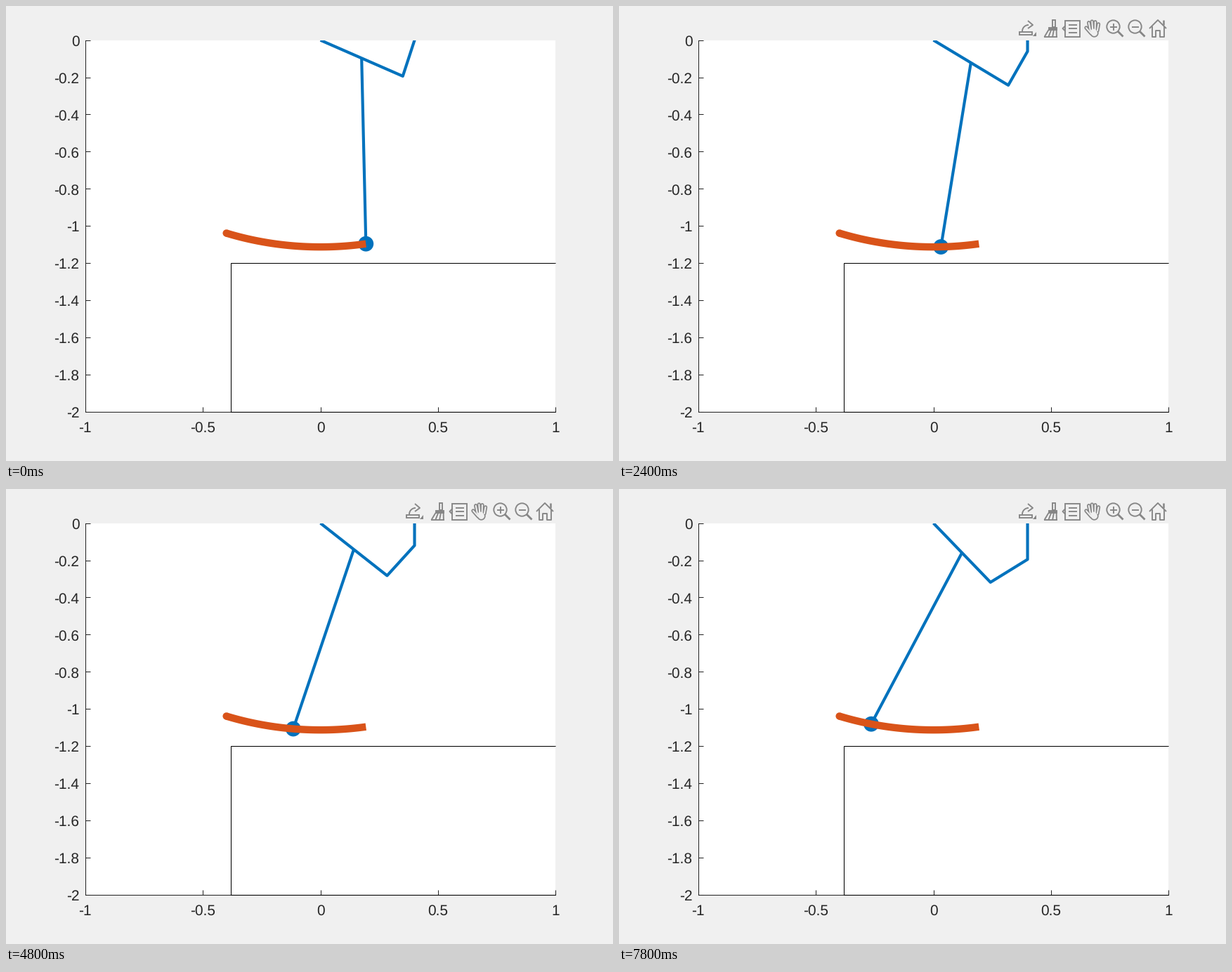
Animation, 864 px wide and 648 px high, one loop 8000 ms. Source, as a matplotlib script:

```python
import numpy as np
import matplotlib.pyplot as plt
from matplotlib.animation import FuncAnimation
from matplotlib.patches import Circle, Ellipse, Rectangle

plt.rcParams["font.family"] = "Liberation Sans"
plt.rcParams["text.hinting"] = "none"

W, H, DPI = 864, 648, 150
PT = 72 / DPI  # points per pixel
LEFT, RIGHT, TOP, BOTTOM = 112.8, 782.4, 48.7, 577.55
FRAMES, INTERVAL = 40, 200
BACK, INK, GREY = "#f0f0f0", "#262626", "#868686"
BLUE, ORANGE = "#0072bd", "#d95319"

CRANK, COUPLER, ROD = 0.4, 0.2, 1.0
RAIL_X = 0.4
STEP = 0.005  # slider drop per frame


def polar(r, angle):
    return r * np.array([np.cos(angle), np.sin(angle)])


def pose(drop):
    """Crank tip, crank middle and bob for a slider at (RAIL_X, -drop)."""
    dist = np.hypot(RAIL_X, drop)
    cos_gap = (CRANK**2 - COUPLER**2 + dist**2) / (2 * CRANK * dist)
    angle = -np.arctan2(drop, RAIL_X) - np.arccos(cos_gap)
    tip = polar(CRANK, angle)
    return tip, tip / 2, tip / 2 + polar(ROD, angle - np.pi / 3)


fig = plt.figure(figsize=(W / DPI, H / DPI), dpi=DPI, facecolor=BACK)
ax = fig.add_axes([LEFT / W, 1 - BOTTOM / H, (RIGHT - LEFT) / W,
                   (BOTTOM - TOP) / H])
ax.set(xlim=(-1, 1), ylim=(-2, 0))
ax.set_axisbelow(True)
ax.spines[["top", "right"]].set_visible(False)
for side in ("left", "bottom"):
    ax.spines[side].set(linewidth=0.5, color=INK, zorder=0.5)

xticks = np.linspace(-1, 1, 5)
yticks = np.linspace(-2, 0, 11)
ax.set_xticks(xticks, [""] * len(xticks))
ax.set_yticks(yticks, [""] * len(yticks))
ax.tick_params(direction="in", length=6.7 * PT, width=0.5, color=INK)


def label(value, xy, offset, ha):
    ax.annotate(f"{round(value, 1):g}", xy, offset, textcoords="offset pixels",
                ha=ha, va="center_baseline", size=10, color=INK,
                annotation_clip=False)


def disc(xy, diameter, color):
    """Round dot of a given size in pixels."""
    dot = Ellipse(xy, diameter * 2 / (RIGHT - LEFT),
                  diameter * 2 / (BOTTOM - TOP), fc=color, ec="none", zorder=2)
    return ax.add_patch(dot)


for x in xticks:
    label(x, (x, -2), (0, -22), "center")
for y in yticks:
    label(y, (-1, y), (-8.3, -0.5), "right")

# Table
ax.plot([1, -0.38, -0.38, 1], [-2, -2, -1.2, -1.2], color="black", lw=0.5,
        solid_capstyle="butt", solid_joinstyle="miter", clip_on=False)

# Moving linkage
style = dict(color=BLUE, lw=2, solid_capstyle="butt", solid_joinstyle="round")
link, = ax.plot([], [], **style)
rod, = ax.plot([], [], **style)
bob_dot = disc((0, 0), 21.8, BLUE)

# Whole path of the bob, up to its turning point
drops = np.linspace(0, CRANK * np.sin(np.pi / 3), 120)
path = np.array([pose(d)[2] for d in drops])
ax.plot(*path.T, color=ORANGE, lw=5, solid_capstyle="butt")
disc(path[-1], 5 / PT, ORANGE)

# Toolbar, in pixels from the top left
bar = fig.add_axes([0, 0, 1, 1])
bar.set(xlim=(0, W), ylim=(H, 0))
bar.axis("off")


def stroke(*points, width=1.9, color=GREY, cap="butt"):
    bar.plot(*zip(*points), color=color, lw=width * PT, solid_capstyle=cap,
             solid_joinstyle="round")


def box(x, y, w, h, color="none"):
    bar.add_patch(Rectangle((x, y), w, h, fc=color, ec=GREY, lw=1.9 * PT))


def export_icon(x):
    turn = np.linspace(np.pi, 1.5 * np.pi, 12)
    stroke(*((x + 2, 36) + polar(9, a) for a in turn))
    stroke((x + 1, 21), (x + 8, 27), (x + 1, 32))
    box(x - 11, 36.5, 18, 4.5)
    bar.fill([x + 8, x + 13, x + 13], [42.5, 42.5, 37], color=GREY, lw=0)


def brush_icon(x):
    box(x + 2, 20, 4, 10)
    box(x - 3, 30.5, 11, 3.5, GREY)
    for k in range(4):
        stroke((x - 3 + 3.7 * k, 34), (x - 9 + 5.8 * k, 44))
    stroke((x - 10, 44), (x + 9, 44))


def note_icon(x):
    box(x - 9.5, 20.5, 20.5, 23)
    stroke((x - 9, 28), (x - 13, 32), (x - 9, 36))
    for y in (26.5, 32, 37.5):
        stroke((x - 5, y), (x + 7, y))


def hand_icon(x):
    fingers = [((x - 4 + 3.3 * k, 35),
                (x - 6.3 + 4.6 * k, 22 + 1.2 * (k - 1.2) ** 2), 2)
               for k in range(4)]
    thumb = ((x - 10, 31), (x - 3, 39), 2)
    palm = ((x + 0.5, 37), (x + 1.5, 38.5), 9)
    parts = [*fingers, thumb, palm]
    for color, rim in ((GREY, 3.4), (BACK, 0)):
        for start, end, width in parts:
            stroke(start, end, width=width + rim, color=color, cap="round")


def lens_icon(x, plus):
    y = 29.5
    bar.add_patch(Circle((x, y), 9.2, fill=False, ec=GREY, lw=1.9 * PT))
    stroke((x + 6.5, y + 6.5), (x + 14, y + 14), width=2.8)
    stroke((x - 5, y), (x + 5, y))
    if plus:
        stroke((x, y - 5), (x, y + 5))


def home_icon(x):
    stroke((x - 12, 32), (x, 20), (x + 12, 32))
    stroke((x + 7.5, 20), (x + 7.5, 27), width=2.5)
    for s in (-1, 1):
        stroke((x + 8.5 * s, 29), (x + 8.5 * s, 44), (x + 3 * s, 44),
               (x + 3 * s, 35), (x, 35))


export_icon(581)
brush_icon(614.5)
note_icon(644.5)
hand_icon(675)
lens_icon(703.5, True)
lens_icon(734.5, False)
home_icon(767)


def update(i):
    drop = STEP * i
    tip, mid, bob = pose(drop)
    link.set_data(*zip((0, 0), tip, (RAIL_X, -drop), (RAIL_X, 0.1)))
    rod.set_data(*zip(mid, bob))
    bob_dot.set_center(bob)
    bar.set_visible(i > 0)
    return link, rod, bob_dot


anim = FuncAnimation(fig, update, frames=FRAMES, interval=INTERVAL,
                     repeat=True, repeat_delay=0)
plt.show()
```
